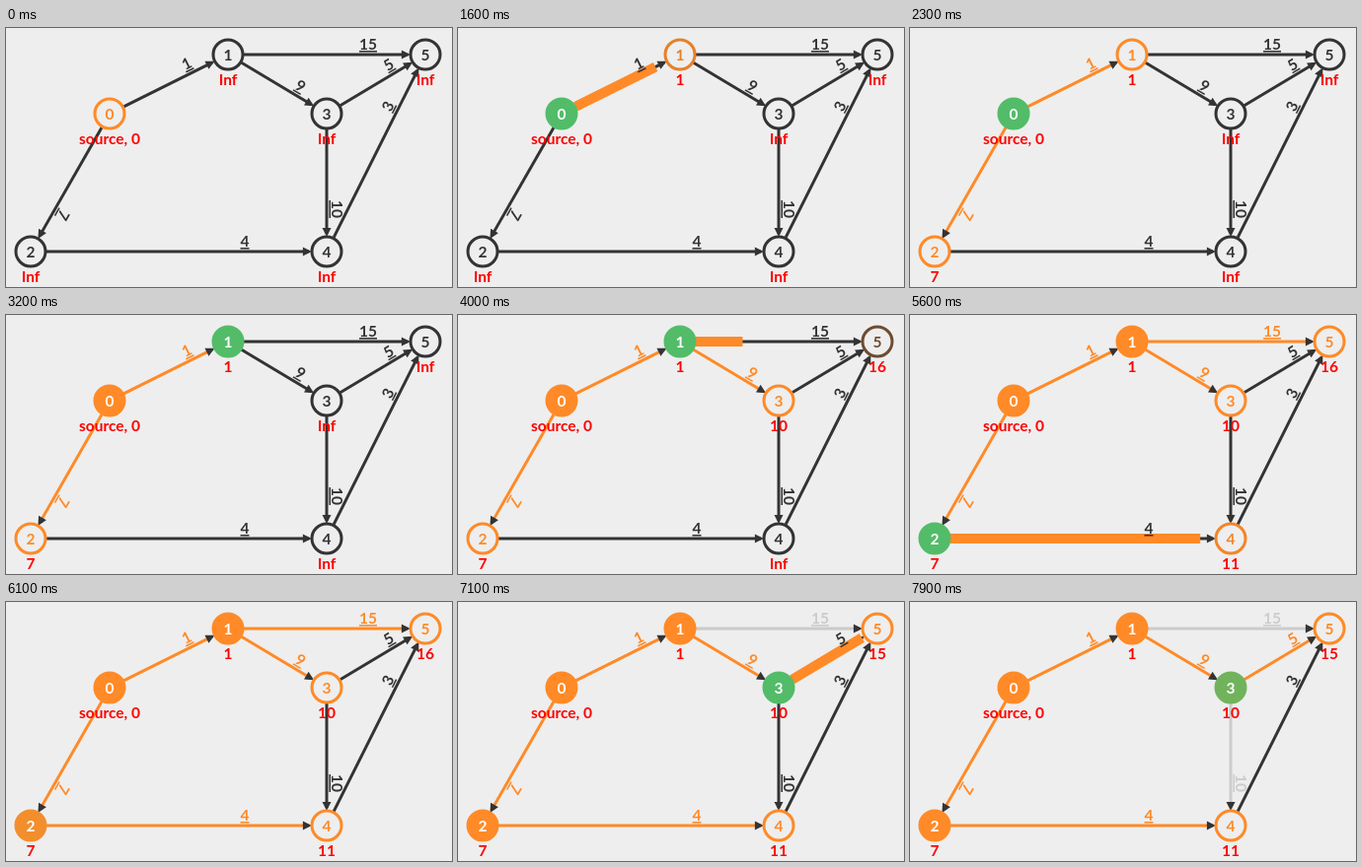
Animation of 452 by 263 pixels, one loop 8000 ms. Source, as an HTML page:

```html
<!DOCTYPE html>
<html lang="en">
<head>
<meta charset="utf-8">
<title>Shortest paths</title>
<style>
  html, body { margin: 0; width: 100%; height: 100%; overflow: hidden; background: #eee; }
  svg { display: block; }
  text { font: bold 15.5px Lato, "Open Sans", sans-serif; text-anchor: middle; }
  .weight { text-decoration: underline; }
  .label { fill: #f00; }
</style>
</head>
<body>
<svg id="stage" width="452" height="263" viewBox="0 0 452 263"></svg>
<script>
const LOOP = 8000, FADE = 300, HOLD = 400, RADIUS = 16;
const BG = [238, 238, 238], DARK = [51, 51, 51], GREY = [204, 204, 204], WHITE = [255, 255, 255];
const ORANGE = [255, 138, 39], GREEN = [82, 188, 105];

// Vertex looks: ring, fill, digit
const IDLE = [DARK, BG, DARK], QUEUED = [ORANGE, BG, ORANGE];
const ACTIVE = [GREEN, GREEN, WHITE], DONE = [ORANGE, ORANGE, WHITE];

const nodes = [
  { x: 105, y: 87, looks: [[0, QUEUED], [865, ACTIVE], [2385, DONE]], labels: [[0, 'source, 0']] },
  { x: 225, y: 27, looks: [[0, IDLE], [1393, QUEUED], [2881, ACTIVE], [4369, DONE]], labels: [[0, 'Inf'], [1393, '1']] },
  { x: 25, y: 227, looks: [[0, IDLE], [1889, QUEUED], [4867, ACTIVE], [5880, DONE]], labels: [[0, 'Inf'], [1889, '7']] },
  { x: 325, y: 87, looks: [[0, IDLE], [3377, QUEUED], [6353, ACTIVE], [7795, DONE]], labels: [[0, 'Inf'], [3377, '10']] },
  { x: 325, y: 227, looks: [[0, IDLE], [5373, QUEUED]], labels: [[0, 'Inf'], [5373, '11']] },
  { x: 425, y: 27, looks: [[0, IDLE], [3877, QUEUED]], labels: [[0, 'Inf'], [3877, '16'], [6857, '15']] }
];

// relax: when the thick bar starts to grow; drop: when the edge fades to grey
const edges = [
  { from: 0, to: 1, weight: 1, relax: 1393 },
  { from: 0, to: 2, weight: 7, relax: 1889 },
  { from: 1, to: 3, weight: 9, relax: 3377 },
  { from: 1, to: 5, weight: 15, relax: 3877, drop: 6857 },
  { from: 2, to: 4, weight: 4, relax: 5373 },
  { from: 3, to: 4, weight: 10, drop: 7349 },
  { from: 3, to: 5, weight: 5, relax: 6857 },
  { from: 4, to: 5, weight: 3 }
];

const stage = document.getElementById('stage');

function add(parent, tag, attrs, text = '') {
  const el = document.createElementNS('http://www.w3.org/2000/svg', tag);
  for (const key in attrs) el.setAttribute(key, attrs[key]);
  el.textContent = text;
  return parent.appendChild(el);
}

function ease(t) {
  t = Math.min(1, Math.max(0, t));
  return t < 0.5 ? 4 * t ** 3 : 1 - 4 * (1 - t) ** 3;
}

const progress = (now, start) => ease((now - start) / FADE);
const mix = (a, b, k) => `rgb(${a.map((v, i) => Math.round(v + (b[i] - v) * k))})`;
const latest = (track, now) => track.findLastIndex(([start]) => start <= now);

for (const e of edges) {
  const a = nodes[e.from], b = nodes[e.to];
  const dx = b.x - a.x, dy = b.y - a.y;
  const angle = Math.atan2(dy, dx) * 180 / Math.PI;
  const end = Math.hypot(dx, dy) - RADIUS;
  const g = add(stage, 'g', { transform: `translate(${a.x} ${a.y}) rotate(${angle})` });
  e.length = end - RADIUS;
  e.line = add(g, 'line', { x1: RADIUS, x2: end - 2, 'stroke-width': 3 });
  add(g, 'path', { d: `M${end + 0.9} 0l-9 -4.5v9z`, fill: '#333' });
  e.bar = add(g, 'rect', { x: RADIUS, y: -5, height: 10, fill: mix(ORANGE, ORANGE, 0) });
  e.text = add(g, 'text', { class: 'weight', x: RADIUS + 0.75 * e.length, y: -5 }, e.weight);
}

nodes.forEach((n, i) => {
  n.disc = add(stage, 'circle', { cx: n.x, cy: n.y, r: 15, 'stroke-width': 3 });
  n.digit = add(stage, 'text', { x: n.x, y: n.y + 5.5 }, i);
});
for (const n of nodes) n.label = add(stage, 'text', { class: 'label', x: n.x, y: n.y + 31 });

function drawEdge(e, now) {
  const settled = now >= e.relax + HOLD;
  const base = settled ? ORANGE : DARK;
  const color = now >= e.drop ? mix(base, GREY, progress(now, e.drop)) : mix(base, base, 0);
  const growing = now >= e.relax && !settled;
  e.line.setAttribute('stroke', color);
  e.text.setAttribute('fill', color);
  e.bar.setAttribute('width', growing ? e.length * progress(now, e.relax) : 0);
}

function drawNode(n, now) {
  const i = latest(n.looks, now);
  const [start, look] = n.looks[i];
  const before = i ? n.looks[i - 1][1] : look;
  const [ring, fill, digit] = look.map((c, j) => mix(before[j], c, progress(now, start)));
  n.disc.setAttribute('stroke', ring);
  n.disc.setAttribute('fill', fill);
  n.digit.setAttribute('fill', digit);
  n.label.textContent = n.labels[latest(n.labels, now)][1];
}

const origin = performance.now();

function frame() {
  const now = Math.max(0, performance.now() - origin) % LOOP;
  for (const e of edges) drawEdge(e, now);
  for (const n of nodes) drawNode(n, now);
  requestAnimationFrame(frame);
}
frame();
</script>
</body>
</html>
```
